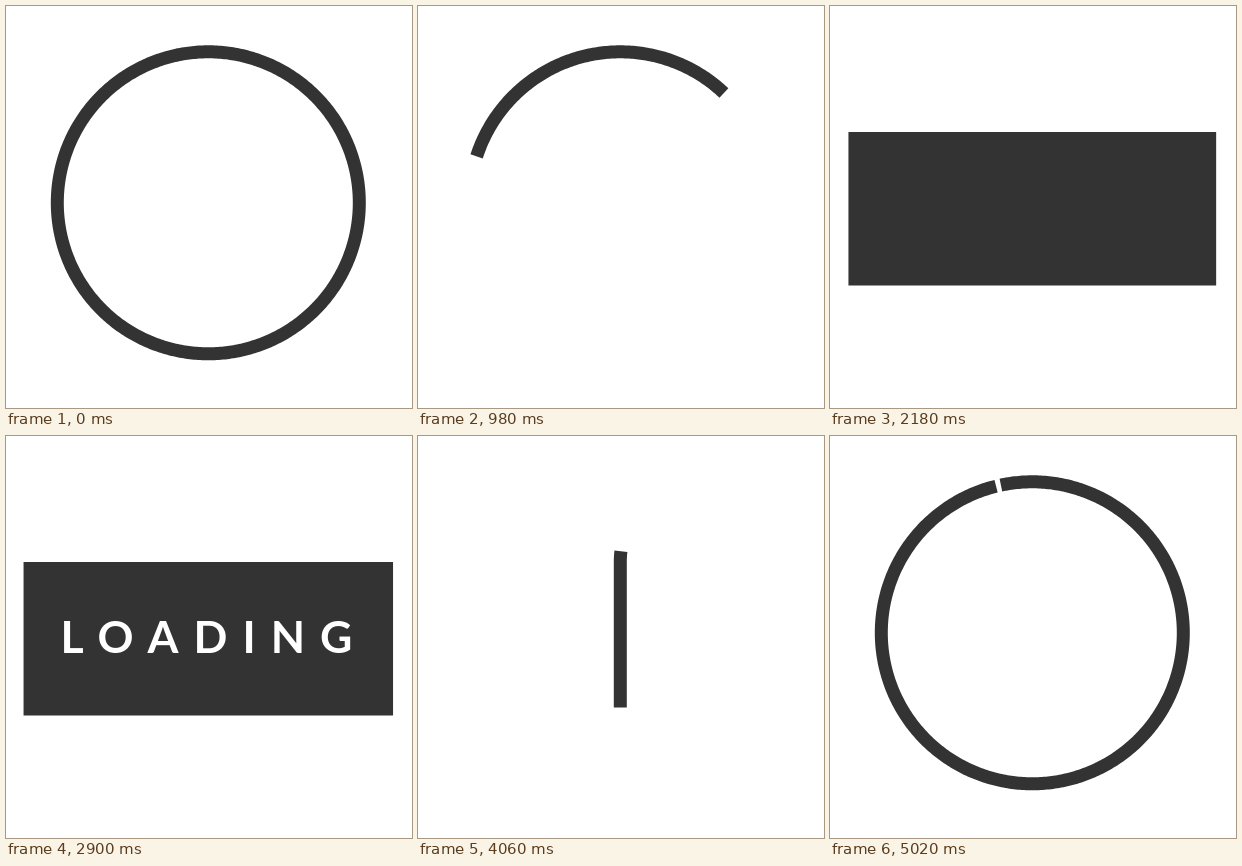
An HTML page with a canvas that plays this animation: 406 px wide and 402 px high, repeating every 5.06 s.

```html
<!DOCTYPE html>
<html lang="en">
<head>
<meta charset="utf-8">
<title>Loading</title>
<style>
  html, body { margin: 0; width: 100%; height: 100%; overflow: hidden; background: #fff; }
  canvas { display: block; width: 406px; height: 402px; }
</style>
</head>
<body>
<canvas id="stage"></canvas>
<script>
const W = 406, H = 402, LOOP = 5060, STEP = 40;
const INK = '#333', STROKE = 13;
const CX = 202.3, CY = 196.8, R = 151;         // ring
const TOP = 126, BOTTOM = 279.5, FULL = 369.5; // panel
const RAD = Math.PI / 180, TURN = 2 * Math.PI;
const SEAM = 258 * RAD;

// A hook leaves the ring along its tangent and bends up into the vertical line.
// All path points are relative to the ring centre.
const JOIN = 55 * RAD, LINE_Y = 71;
const onRing = a => [R * Math.cos(a), R * Math.sin(a)];
const [jx, jy] = onRing(JOIN);
const HOOK = [
  [jx, jy],
  [jx - 40 * Math.sin(JOIN), jy + 40 * Math.cos(JOIN)],
  [0, LINE_Y + 58],
  [0, LINE_Y]
];

function bezier(t) {
  const s = 1 - t;
  const k = [s * s * s, 3 * s * s * t, 3 * s * t * t, t * t * t];
  return [0, 1].map(axis => HOOK.reduce((sum, p, i) => sum + p[axis] * k[i], 0));
}

// Running length of the hook at even parameter steps.
const N = 64, lengths = [0];
for (let i = 1; i <= N; i++) {
  const [x0, y0] = bezier((i - 1) / N), [x1, y1] = bezier(i / N);
  lengths.push(lengths[i - 1] + Math.hypot(x1 - x0, y1 - y0));
}
const HOOK_LEN = lengths[N];

// Point at distance u along the path; 0 is where ring meets hook.
function pointAt(u) {
  if (u <= 0) return onRing(JOIN + u / R);
  if (u >= HOOK_LEN) return [0, LINE_Y - (u - HOOK_LEN)];
  const i = lengths.findIndex(len => len > u);
  const part = (u - lengths[i - 1]) / (lengths[i] - lengths[i - 1]);
  return bezier((i - 1 + part) / N);
}

const lineAt = y => HOOK_LEN + LINE_Y - y;

const canvas = document.getElementById('stage');
const ctx = canvas.getContext('2d');
const dpr = window.devicePixelRatio || 1;
canvas.width = W * dpr;
canvas.height = H * dpr;

function ease(t, from, to) {
  const p = Math.min(1, Math.max(0, (t - from) / (to - from)));
  return p < 0.5 ? 2 * p * p : 1 - 2 * (1 - p) ** 2;
}

const mix = (a, b, p) => a + (b - a) * p;

// Strokes the path from a to b, upright or upside down.
function stretch(a, b, flip) {
  const n = Math.ceil((b - a) / 2);
  ctx.save();
  ctx.translate(CX, CY);
  ctx.scale(1, flip);
  ctx.beginPath();
  for (let i = 0; i <= n; i++) ctx.lineTo(...pointAt(mix(a, b, i / n)));
  ctx.stroke();
  ctx.restore();
}

function ringToLine(t) {
  const start = (SEAM - JOIN - 2 * TURN) * R;
  const tail = mix(start, lineAt(BOTTOM - CY), ease(t, 136, 1766));
  const head = mix(start + TURN * R + 1, lineAt(TOP - CY), ease(t, 610, 1745));
  stretch(tail, head, 1);
}

// The way back is the same path upside down, run in reverse.
function lineToRing(t) {
  const end = (SEAM + JOIN) * R;
  const tail = mix(-lineAt(CY - BOTTOM), end, ease(t, 4000, 5000));
  const head = mix(-lineAt(CY - TOP), end + TURN * R, ease(t, 4004, 5058));
  stretch(-head, -tail, -1);
}

function panel(t) {
  const open = ease(t, 1800, 2200) - ease(t, 3750, 4030);
  const w = mix(STROKE, FULL, open);
  ctx.save();
  ctx.beginPath();
  ctx.rect(CX - w / 2, TOP, w, BOTTOM - TOP);
  ctx.fill();
  ctx.clip();
  label(ease(t, 2390, 2900));
  ctx.restore();
}

function label(p) {
  if (p <= 0) return;
  ctx.font = '700 44.6px Lato, sans-serif';
  ctx.letterSpacing = '15px';
  ctx.globalAlpha = p;
  ctx.fillStyle = '#fff';
  ctx.fillText('LOADING', 54.5, 216.9 + 14 * (1 - p));
}

function draw(t) {
  ctx.setTransform(dpr, 0, 0, dpr, 0, 0);
  ctx.fillStyle = '#fff';
  ctx.fillRect(0, 0, W, H);
  ctx.fillStyle = ctx.strokeStyle = INK;
  ctx.lineWidth = STROKE;
  if (t < 1800) ringToLine(t);
  else if (t < 4030) panel(t);
  else lineToRing(t);
}

const begin = performance.now();
function tick() {
  const t = (performance.now() - begin) % LOOP;
  draw(t < 180 ? 0 : t - (t - 20) % STEP);
  requestAnimationFrame(tick);
}
tick();
</script>
</body>
</html>
```
